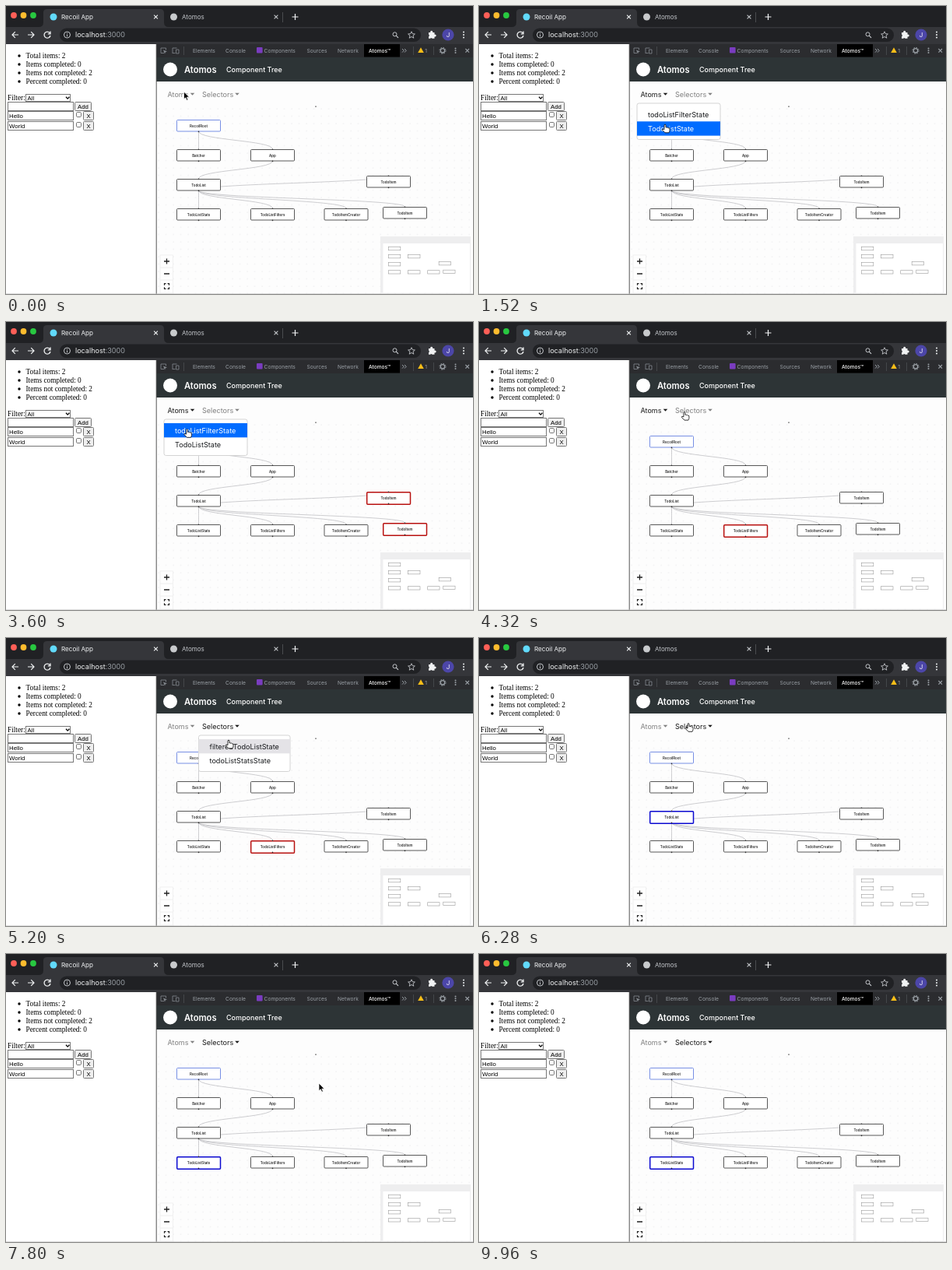
These frames come from a looping animation (600 px wide and 370 px high, 10 s). An HTML page:

```html
<!DOCTYPE html>
<html lang="en">
<head>
<meta charset="utf-8">
<title>Component tree</title>
<style>
  html, body { margin: 0; width: 100%; height: 100%; overflow: hidden; background: #fff; }
  svg { display: block; width: 600px; height: 370px; font-family: Inter, sans-serif; }
  .serif { font-family: "Liberation Serif", serif; }
  .arial { font-family: "Liberation Sans", sans-serif; }
</style>
</head>
<body>
<svg id="stage" viewBox="0 0 600 370"></svg>
<script>
const LOOP = 10000;

const rect = (x, y, w, h, fill, more = '') =>
  `<rect x="${x}" y="${y}" width="${w}" height="${h}" fill="${fill}" ${more}/>`;
const disc = (x, y, r, fill, more = '') =>
  `<circle cx="${x}" cy="${y}" r="${r}" fill="${fill}" ${more}/>`;
const text = (x, y, size, fill, str, more = '') =>
  `<text x="${x}" y="${y}" font-size="${size}" fill="${fill}" ${more}>${str}</text>`;
const line = (d, stroke, width = 1, more = '') =>
  `<path d="${d}" fill="none" stroke="${stroke}" stroke-width="${width}" ${more}/>`;
const shape = (d, fill, more = '') => `<path d="${d}" fill="${fill}" ${more}/>`;
const cross = (x, y, r, color) =>
  line(`M${x - r} ${y - r}l${2 * r} ${2 * r}m0 ${-2 * r}l${-2 * r} ${2 * r}`, color, 1.1);
const dots = (x, y, gap, color) =>
  [-gap, 0, gap].map(d => disc(x, y + d, 1, color)).join('');
const MEDIUM = 'font-weight="500"';

function browserBar() {
  const grey = '#c4c7cb', white = '#f1f3f4';
  return rect(0, 0, 600, 49, '#202124') +
    shape('M42 27Q48 27 48 21V8Q48 4 53 4H198Q203 4 203 9V21Q203 27 209 27Z', '#35363a') +
    rect(0, 27, 600, 22, '#35363a') +
    disc(10, 12, 3.9, '#ff5f57') + disc(22.5, 12, 3.9, '#febc2e') + disc(35, 12, 3.9, '#28c840') +
    disc(61, 14, 4.5, '#61dafb') + text(71, 17.3, 8.1, white, 'Recoil App') + cross(192.5, 14, 2.4, white) +
    disc(215.5, 14, 4.5, '#c8cacc') + text(226, 17.3, 8, grey, 'Atomos') + cross(347, 14, 2.4, grey) +
    line('M355.5 8v13', '#55575b', .8) + line('M367.5 14h8m-4-4v8', white, 1.2) +
    line('M16 37H8m3.8-3.8L8 37l3.8 3.8M28 37h8m-3.8-3.8L36 37l-3.8 3.8', white, 1.2) +
    line('M56.2 34.6A4 4 0 1 0 57 38M57 32.6v3.2h-3.2', white, 1.3) +
    rect(69, 28.5, 464, 17.5, '#202124', 'rx="8.7"') +
    disc(78.5, 37, 4, 'none', `stroke="${grey}"`) + line('M78.5 36.5v2.8m0-4.8v1', grey) +
    text(89, 40.4, 9.05, white, 'localhost<tspan fill="#9aa0a6">:3000</tspan>') +
    disc(499.5, 36.3, 2.5, 'none', `stroke="${grey}"`) + line('M501.3 38.2l2.7 2.7', grey, 1.2) +
    line('M521 32.8l1.3 2.9 3.1.3-2.4 2.1.8 3.1-2.8-1.7-2.8 1.7.8-3.1-2.4-2.1 3.1-.3z', grey, .9) +
    shape('M543 34h2.2a1.6 1.6 0 1 1 3 0h2.3v2.5a1.6 1.6 0 1 1 0 3v2.3H547.6a1.6 1.6 0 0 0-2.4 0H543v-2.4a1.6 1.6 0 0 0 0-2.8z', white) +
    disc(568, 37, 7.6, '#4c46a8') + text(568, 40, 8, '#fff', 'J', 'text-anchor="middle"') +
    dots(588, 37, 3.6, white);
}

function todoPage() {
  const stats = ['Total items: 2', 'Items completed: 0', 'Items not completed: 2', 'Percent completed: 0'];
  const box = (x, y, w, h, fill = '#fff', rx = 0) =>
    rect(x + .5, y + .5, w - 1, h - 1, fill, `stroke="#767676" rx="${rx}"`);
  const label = (x, y, str) => text(x, y, 7.8, '#000', str, 'class="arial"');
  const item = (y, str) => box(2, y, 85, 12) + label(4, y + 9, str) +
    box(90, y + 1, 7, 7, '#fff', 1.3) + box(99, y, 14, 12, '#efefef', 1) + label(103.4, y + 9, 'X');
  return rect(0, 49, 193, 321, '#fff') +
    stats.map((s, i) => disc(17, 64 + 11 * i, 1.7, '#000') +
      text(25.5, 67 + 11 * i, 9.3, '#000', s, 'class="serif"')).join('') +
    text(2, 121, 9.3, '#000', 'Filter:', 'class="serif"') +
    box(25, 113, 58, 10) + label(27.5, 120.8, 'All') + line('M77 116.7l2.2 2.4 2.2-2.4', '#000', 1.3) +
    box(2, 123, 85, 12) + box(88, 123, 22, 12, '#efefef', 1) + label(92, 131.7, 'Add') +
    item(135, 'Hello') + item(148, 'World');
}

function devtools() {
  const grey = '#9aa0a6', dim = '#858a90';
  const tabs = [[240, 'Elements'], [282, 'Console'], [331.5, 'Components'], [386.5, 'Sources'], [426, 'Network']];
  return rect(193, 49, 407, 17, '#2b2c2f') +
    tabs.map(([x, s]) => text(x, 59.7, 6.7, grey, s)).join('') +
    rect(460, 49, 46, 16.5, '#000') + text(466, 59.7, 6.6, '#fff', 'Atomos™', MEDIUM) +
    line('M203 60.5h-4v-6.5h6.5v2.5', dim, .8) + shape('M202 56.5l5 2-2.2.8-.8 2.2z', dim) +
    line('M214 60v-6h5.5M213.5 60.5h4M218.5 56h3.5v5h-3.5z', dim, .8) +
    line('M228.5 52v11M523.5 52v11M549.5 52v11', '#4c4e52', .8) +
    rect(322, 53, 7.6, 7.6, '#7a3cc0', 'rx="1"') +
    line('M509 55l2.3 2.3-2.3 2.3m3 -4.6l2.3 2.3-2.3 2.3', grey) +
    shape('M533 53.3l3.8 6.7h-7.6z', '#f5bd18') + text(538.3, 59.7, 6.7, grey, '1') +
    disc(561, 57.3, 2.7, 'none', `stroke="${grey}" stroke-width="1.3"`) +
    disc(561, 57.3, 4, 'none', `stroke="${grey}" stroke-width="1" stroke-dasharray="1.57"`) +
    dots(577.5, 57.3, 2.8, grey) + cross(592.7, 57.3, 2.3, grey) +
    rect(193, 66, 407, 31, '#2d3436') + disc(211, 81.5, 9, '#fff') +
    text(229, 86, 11.2, '#fff', 'Atomos', 'font-weight="600"') +
    text(283, 85, 9, '#fff', 'Component Tree', MEDIUM) +
    rect(193, 97, 407, 273, '#fdfdfd');
}

const W = 57, H = 15;
const nodes = [
  ['RecoilRoot', 219, 146], ['Batcher', 219, 184], ['App', 314, 184], ['TodoList', 219, 222],
  ['TodoListStats', 219, 260], ['TodoListFilters', 314, 260], ['TodoItemCreator', 408.5, 260],
  ['TodoItem', 484, 258], ['TodoItem', 463, 218]
];
const links = [[0, 1], [0, 2], [2, 3], [3, 4], [3, 5], [3, 6], [3, 7], [3, 8]];

function edge([from, to]) {
  const x1 = nodes[from][1] + W / 2, y1 = nodes[from][2] + H;
  const x2 = nodes[to][1] + W / 2, y2 = nodes[to][2], mid = (y1 + y2) / 2;
  return line(`M${x1} ${y1}C${x1} ${mid} ${x2} ${mid} ${x2} ${y2}`, '#bcbcc0', .75);
}

function node([name, x, y], i, accent) {
  const border = accent || (i ? '#3a3a3a' : '#5f7be0');
  const box = accent
    ? rect(x + .7, y + .8, W - 1.2, H + .5, '#fff', `rx="1" stroke="${border}" stroke-width="1.5"`)
    : rect(x + .5, y + .5, W - 1, H - .5, '#fff', `rx="1" stroke="${border}" stroke-width=".85"`);
  return box +
    (i ? disc(x + W / 2, y + .2, .8, '#333') : '') + disc(x + W / 2, y + H + .4, .8, '#333') +
    text(x + W / 2, y + (accent ? 10.3 : 9.5), 4.5, '#111', name, `text-anchor="middle" ${MEDIUM}`);
}

function flowBackdrop() {
  const thumb = ([, x, y]) => rect(491.5 + (x - 219) * .265, 309.5 + (y - 146) * .265, 15.3, 4.3,
    '#fff', 'stroke="#999" stroke-width=".6"');
  return `<defs><pattern id="grid" x="194" y="130" width="9.5" height="9.5" patternUnits="userSpaceOnUse">
    ${disc(2, 2, .5, '#d9d9dd')}</pattern></defs>` +
    rect(194, 130, 406, 240, 'url(#grid)') + rect(397, 128.7, 2, .8, '#333') +
    links.map(edge).join('') +
    rect(481, 296, 116, 72.5, '#eeeeef') + rect(484.5, 305, 111.5, 63.5, '#fff') + nodes.map(thumb).join('') +
    rect(198, 320, 16.5, 49, '#fefefe', 'stroke="#eee" stroke-width=".8"') +
    line('M198 336h16.5M198 352h16.5', '#eee') +
    line('M203 328h7m-3.5-3.5v7M203 344h7', '#222', 1.3) +
    line('M203.5 358.7v-2h2m2 0h2v2m0 2.6v2h-2m-2 0h-2v-2', '#222', 1.2) +
    line('M193.2 49V370', '#555') + line('M0 369.7H600', '#bbb', .6);
}

const menus = [
  { label: 'Atoms', x: 207.5, caret: 239.5, left: 203, width: 107, items: ['todoListFilterState', 'TodoListState'] },
  { label: 'Selectors', x: 252, caret: 297, left: 247.5, width: 117.5, items: ['filteredTodoListState', 'todoListStatsState'] }
];
const ROW_TOP = 130, ROW = 18.3;
const RED = '#b8100f', BLUE = '#0a08d0', PRESS = 120;
const picks = [
  { open: 640, close: 1600, menu: 0, lit: [7, 8], color: RED },
  { open: 2800, close: 3680, menu: 0, lit: [5], color: RED },
  { open: 4720, close: 5560, menu: 1, lit: [3], color: BLUE },
  { open: 6440, close: 7160, menu: 1, lit: [4], color: BLUE }
];

function toggle(menu, focused) {
  const color = focused ? '#1a1a1a' : '#808080';
  return text(menu.x, 116.9, 9.05, color, menu.label) +
    shape(`M${menu.caret - 2.8} 111.8h5.6l-2.8 3z`, color);
}

function dropdown(menu, cursorY, pressed) {
  const hovered = Math.floor((cursorY - ROW_TOP) / ROW);
  const row = (s, i) => {
    const y = ROW_TOP + i * ROW, on = i === hovered;
    return (on ? rect(menu.left, y, menu.width, ROW, pressed ? '#006cff' : '#e4e3e7') : '') +
      text(menu.left + 14, y + 13, 9.15, on && pressed ? '#fff' : '#16181b', s);
  };
  return rect(menu.left, 125, menu.width, 46.5, '#fff', 'rx="2.5" stroke="#d0d0d0" stroke-width=".9"') +
    menu.items.map(row).join('');
}

// Cursor stops: time, x, y
const stops = [
  [0, 228.5, 110], [200, 228.5, 110], [500, 228, 111], [760, 228, 111], [1240, 239, 152], [1700, 239, 152],
  [2500, 229, 111], [2900, 229, 111], [3280, 232.5, 137.5], [3800, 232.5, 137.5], [4500, 270, 111], [4840, 270, 111],
  [5160, 286, 131], [5680, 286, 131], [6200, 269, 109.5], [6520, 269, 109.5], [6900, 283, 153],
  [7240, 283, 153], [7720, 402, 166], [8500, 402, 166], [9100, 440, -16], [LOOP, 440, -16]
];

function cursorAt(t) {
  const i = stops.findIndex(s => s[0] > t);
  const [t0, x0, y0] = stops[i - 1], [t1, x1, y1] = stops[i];
  const u = (t - t0) / (t1 - t0), k = u * u * (3 - 2 * u);
  return [x0 + (x1 - x0) * k, y0 + (y1 - y0) * k];
}

function cursor(x, y, hand) {
  const outline = hand
    ? 'M-1 .8Q0-.6 1 .8V4Q2 3.2 2.8 4.3 3.8 3.6 4.5 4.8 6 4.3 6 6V8Q6 9 5 10.8H0L-3.5 7.2Q-4 5-1 6.6Z'
    : 'M0 0V9.8L2.2 7.8 3.8 11.3 5.4 10.6 3.9 7.2H7Z';
  const [fill, stroke] = hand ? ['#fff', '#000'] : ['#000', '#fff'];
  return `<g transform="translate(${x} ${y})">` +
    shape(outline, fill, `stroke="${stroke}" stroke-width=".8" stroke-linejoin="round"`) + '</g>';
}

const stage = document.getElementById('stage');
stage.innerHTML = browserBar() + todoPage() + devtools() + flowBackdrop() + '<g id="live"></g>';
const live = document.getElementById('live');

function render(t) {
  const [x, y] = cursorAt(t);
  const current = picks.findLast(p => t >= p.open);
  const chosen = picks.findLast(p => t >= p.close);
  const isOpen = current && t < current.close;
  const onToggle = t > 200 && x < 300 && y > 100 && y < 121;
  live.innerHTML =
    nodes.map((n, i) => node(n, i, chosen && chosen.lit.includes(i) && chosen.color)).join('') +
    menus.map((m, i) => toggle(m, current && current.menu === i)).join('') +
    (isOpen ? dropdown(menus[current.menu], y, t >= current.close - PRESS) : '') +
    cursor(x, y, onToggle || isOpen);
}

function tick() {
  render(performance.now() % LOOP);
  requestAnimationFrame(tick);
}
tick();
</script>
</body>
</html>
```
